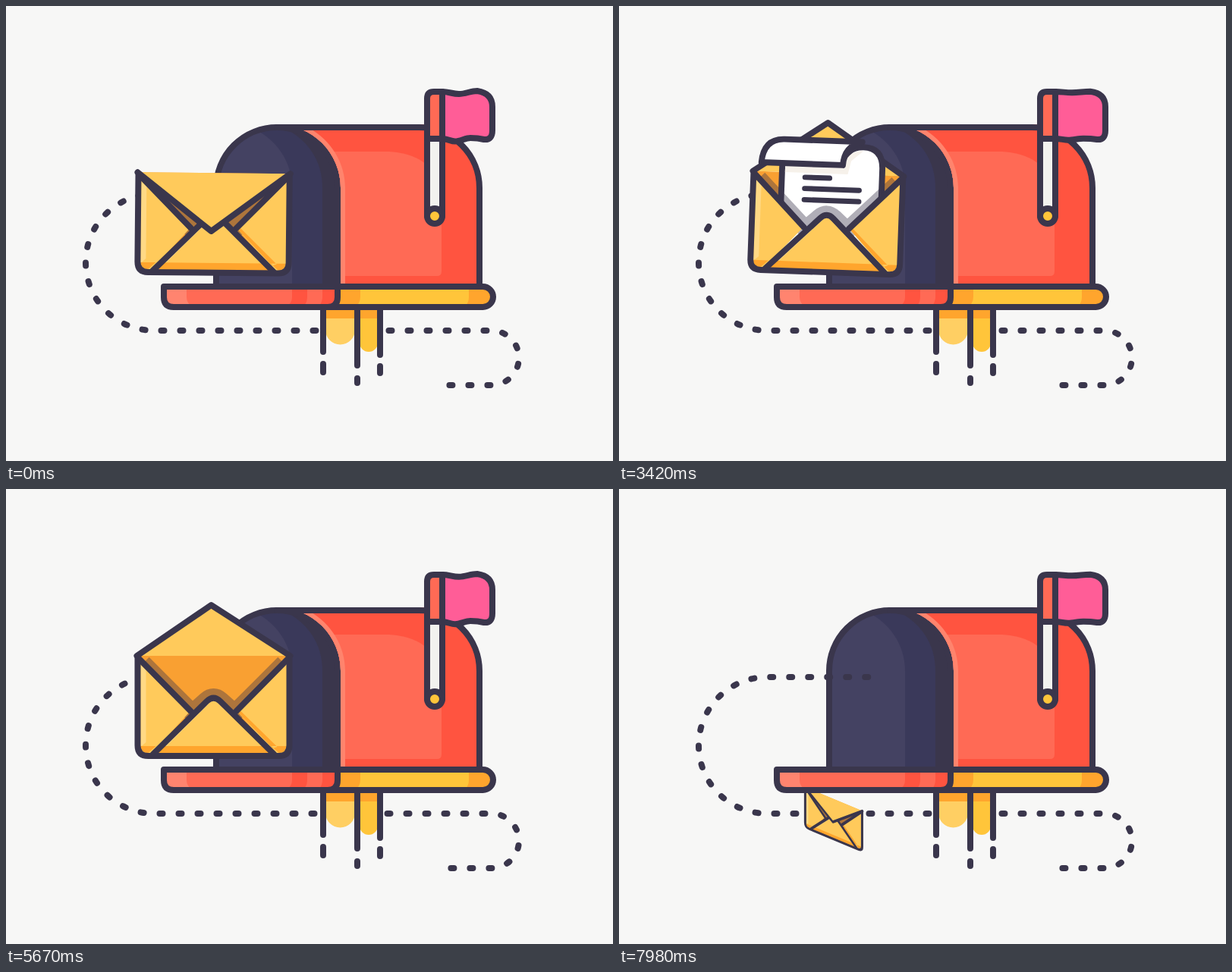
These frames come from a looping animation (800x600 px, 8 s). An HTML page:

```html
<!DOCTYPE html>
<html lang="en">
<head>
<meta charset="utf-8">
<title>Mailbox</title>
<style>
  html, body { margin: 0; width: 100%; height: 100%; overflow: hidden; background: #f7f7f6; }
  svg { display: block; width: 100vw; height: 100vh; }
  .ink { stroke: #3a364c; stroke-width: 8; stroke-linecap: round; stroke-linejoin: round; }
  .thin { stroke-width: 7; }
  .line { fill: none; }
  .yellow { fill: #ffca5b; }
  .shine { fill: #ffd985; }
  .inside { fill: #f9a032; }
  .amber { fill: #ffa52d; }
  .gold { fill: #ffc53a; }
  .red { fill: #ff5440; }
  .coral { fill: #ff6a55; }
  .rose { fill: #ff846f; }
  .shade { fill: none; stroke: #3a364c; stroke-opacity: .4; stroke-width: 23; stroke-linejoin: round; }
</style>
</head>
<body>
<svg viewBox="0 0 800 600">
  <defs>
    <clipPath id="mouth"><path d="M277 370V240A80 80 0 0 1 437 240V370Z"/></clipPath>
    <clipPath id="body"><path d="M357 156H544A80 80 0 0 1 624 240V370H441V240A84 84 0 0 0 357 156Z"/></clipPath>
    <clipPath id="tray"><path d="M208 370H437V384Q437 397 424 397H221Q208 397 208 384Z"/></clipPath>
    <clipPath id="base"><path d="M437 370H628.5a13.5 13.5 0 0 1 0 27H425Z"/></clipPath>
    <clipPath id="room"><path d="M-130 -200H130V60H-130Z"/></clipPath>
    <clipPath id="lining"><path d="M-95 -68L-3 -131L95 -68V60H-95Z"/></clipPath>
  </defs>

  <!-- mouth -->
  <g clip-path="url(#mouth)">
    <path fill="#3a364c" d="M270 150H445V370H270Z"/>
    <path fill="#3a395a" d="M270 370V150H340C390 165 417 197 417 240V370Z"/>
    <path fill="#444262" d="M270 370V160H322C356 174 377 205 377 240V370Z"/>
  </g>
  <path class="ink line" d="M277 370V240A80 80 0 0 1 437 240V370"/>

  <path id="trail" class="ink line" stroke-dasharray="4 21"
    d="M348 248H195A90 90 0 0 0 195 428H640A36 36 0 0 1 640 500H584"/>
  <path id="course" fill="none"
    d="M273 288C200 235 105 255 105 338A90 98 0 0 0 195 436H648A32 32 0 0 1 648 500H584"/>

  <g id="mail">
    <g class="envelope">
      <path class="inside" d="M-100 -68H100V50Q100 64 86 64H-86Q-100 64 -100 50Z"/>
      <path class="flap-back ink yellow"/>
      <g clip-path="url(#room)">
        <g class="letter">
          <path class="ink" fill="#fff" d="M-62 -84V90H72V-80Q72 -109 46 -109Q22 -109 19 -84Z"/>
          <path fill="#f6f1ea" d="M-58 -81H20Q24 -104 46 -104L30 -90L26 -72H-58Z"/>
          <path class="ink" fill="#fff" d="M-90 -84Q-88 -116 -60 -116H44Q20 -110 19 -84Z"/>
          <path class="ink thin line" d="M-31 -66H2M-31 -51H42M-31 -36H42"/>
        </g>
      </g>
      <path class="shade" d="M-93 -58L-28 7L-10 -9Q0 -18 10 -9L28 7L93 -58"/>
      <path class="yellow" d="M-100 -66L-30 4L-84 64Q-100 64 -100 50ZM100 -66L30 4L84 64Q100 64 100 50Z"/>
      <path class="shine" d="M-96 -56L-89 -49V46L-96 52Z"/>
      <path class="amber" d="M-96 51H-76L-86 60Q-96 60 -96 51ZM96 51H76L86 60Q96 60 96 51ZM30 4L36 5L84 52L78 54Z"/>
      <path class="ink line" d="M-98 -64L-30 5M98 -64L30 5"/>
      <path class="yellow" d="M-80 63L-9 -8Q0 -17 9 -8L80 63Z"/>
      <path class="shine" d="M-70 54L-8 -6L-2 -9L-62 51Z"/>
      <path class="amber" d="M-76 62L-66 51H66L76 62Z"/>
      <path class="ink line" d="M-80 62L-9 -8Q0 -17 9 -8L80 62"/>
      <path class="ink line" d="M-100 -66V50Q-100 64 -86 64H86Q100 64 100 50V-66"/>
      <path class="flap-front ink yellow"/>
    </g>
  </g>

  <!-- posts -->
  <path fill="#ffcf63" d="M421 400H460V427A19.5 19.5 0 0 1 421 427Z"/>
  <path class="gold" d="M466 400H490V444A12 12 0 0 1 466 444Z"/>
  <path class="amber" d="M421 400H490V412H421Z"/>
  <path class="ink line" d="M418 400V456M418 472V483M463 400V474M463 491V497M493 400V460M493 475V484"/>

  <!-- body -->
  <g clip-path="url(#body)">
    <path class="red" d="M357 150H630V370H357Z"/>
    <path class="coral" d="M400 192H505C545 194 574 215 574 255V350Q574 356 568 356H400Z"/>
    <path fill="#ff846d" d="M380 160H398C430 178 447 208 447 240V370H437V240Z"/>
  </g>
  <path class="ink line" d="M357 160H544A80 80 0 0 1 624 240V370"/>

  <!-- shelf -->
  <g clip-path="url(#base)">
    <path class="gold" d="M420 366H650V400H420Z"/>
    <path class="amber" d="M420 366H467V383Q467 393 459 397H420ZM610 366H650V400H600Q610 394 610 384Z"/>
  </g>
  <path class="ink line" d="M437 370H628.5a13.5 13.5 0 0 1 0 27H425"/>
  <g clip-path="url(#tray)">
    <path class="coral" d="M205 366H441V400H205Z"/>
    <path class="rose" d="M205 366H238V384Q238 392 246 397H205Z"/>
    <path class="red" d="M377 366H397V384Q397 394 389 397H369Q377 392 377 384ZM417 366H441V400H409Q417 392 417 384Z"/>
  </g>
  <path class="ink line" d="M208 370H437V384Q437 397 424 397H221Q208 397 208 384Z"/>

  <!-- flag -->
  <path id="flag" class="ink" fill="#ff5d97"/>
  <path class="ink" fill="#f2f2ef" d="M555 175V277H575V175Z"/>
  <path class="ink coral" d="M555 175V122Q555 113 564 113H575V175Z"/>
  <circle cx="565" cy="277" r="10" class="ink gold"/>
</svg>
<script>
  const LOOP = 8000, CYCLE = 3600, DASH = 380, WAVE = 475;
  const EMERGE = 1290, LEAVE = 3990, GONE = 5160;

  // flight: time, distance along the course, yaw, size
  const FLIGHT = [
    [LEAVE, 0, 0, 1],
    [4380, 456, .35, .4],
    [4680, 589, Math.PI / 2, .44],
    [4920, 868, Math.PI * 1.5, .22],
    [GONE, 982, Math.PI * 2, 0]
  ];

  const $ = id => document.getElementById(id);
  const mix = (a, b, u) => a + (b - a) * u;
  const ramp = (t, from, to) => {
    const u = Math.min(1, Math.max(0, (t - from) / (to - from)));
    return u * u * (3 - 2 * u);
  };

  const mail = $('mail'), course = $('course');
  mail.append(mail.firstElementChild.cloneNode(true));
  const envelopes = [...mail.children].map(root => ({
    root,
    back: root.querySelector('.flap-back'),
    front: root.querySelector('.flap-front'),
    letter: root.querySelector('.letter')
  }));

  function hover(life) {
    const arrive = ramp(life, EMERGE, 1850);
    const raised = ramp(life, 2190, 2600) - ramp(life, 3400, 3700);
    const x = mix(452, 273.5, arrive), y = mix(327, 288, arrive);
    const tilt = -15 * (1 - arrive) + 2.1 * raised;
    const size = mix(.2, 1, arrive) - .015 * raised;
    return `translate(${x} ${y}) rotate(${tilt}) scale(${size})`;
  }

  function fly(life) {
    const next = FLIGHT.findIndex(key => key[0] > life);
    const from = FLIGHT[next - 1], to = FLIGHT[next];
    const u = (life - from[0]) / (to[0] - from[0]);
    const [, distance, yaw, size] = from.map((v, i) => mix(v, to[i], u));
    const { x, y } = course.getPointAtLength(distance);
    const roll = -11.5 * Math.max(0, yaw - Math.PI / 2);
    return `translate(${x} ${y}) rotate(${roll})
      matrix(${size * Math.cos(yaw)} ${.6 * size * Math.sin(2 * yaw)} 0 ${size} 0 0)`;
  }

  function drawEnvelope({ root, back, front, letter }, life) {
    const alive = life >= EMERGE && life < GONE;
    root.style.display = alive ? '' : 'none';
    if (!alive) return;
    root.setAttribute('transform', life < LEAVE ? hover(life) : fly(life));

    const tip = 9 - 145 * (ramp(life, 1900, 2080) - ramp(life, 3490, 3590));
    const flap = `M-101 -68L-3 ${tip}L101 -68`, open = tip < -68;
    back.setAttribute('d', open ? flap : '');
    front.setAttribute('d', open ? '' : flap);

    const out = ramp(life, 2190, 2600) - ramp(life, 3410, 3530);
    const drop = 170 * (1 - out) + 10 * (1 - ramp(life, 2600, 3400));
    letter.setAttribute('transform', `translate(0 ${drop})`);
    letter.style.display = out > 0 ? '' : 'none';
  }

  function drawFlag(t) {
    const wave = Math.cos(2 * Math.PI * t / WAVE);
    const dip = 2.5 * wave, rise = wave;
    $('flag').setAttribute('d', `M575 113C584 113 588 ${113.5 + dip} 597 ${113.5 + dip}
      S612 ${113 - rise} 621 ${113 - rise}Q641 115 641 133V164Q641 177 630 176
      C622 ${175 - rise} 618 ${175 - rise} 612 ${175 - rise}S598 ${176 + dip} 592 ${176 + dip}
      S582 175 575 175Z`);
  }

  const start = performance.now();
  function frame() {
    const t = (performance.now() - start) % LOOP, phase = t % CYCLE;
    $('trail').setAttribute('stroke-dashoffset', -(19.7 + 25 * t / DASH));
    envelopes.forEach((envelope, i) => drawEnvelope(envelope, phase + i * CYCLE));
    drawFlag(t);
    requestAnimationFrame(frame);
  }
  frame();
</script>
</body>
</html>
```
